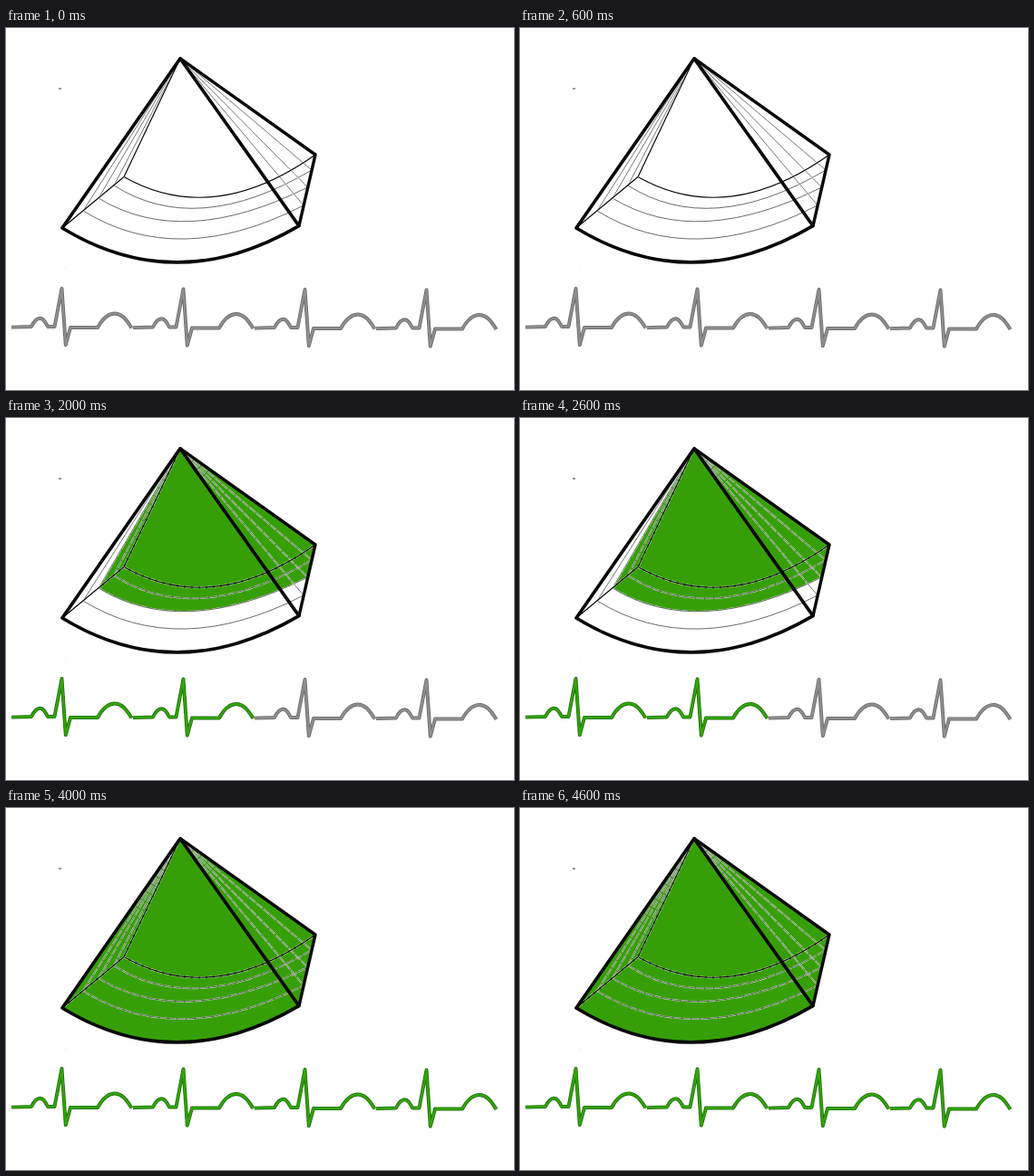
An HTML page for the animation above (5 s loop, 560 by 400 pixels).

```html
<!DOCTYPE html>
<html lang="en">
<head>
<meta charset="utf-8">
<title>Sector volume over four heartbeats</title>
<style>
  html, body { margin: 0; width: 100%; height: 100%; overflow: hidden; background: #fff; }
  svg { display: block; }
  path { fill: none; stroke-linejoin: round; }
</style>
</head>
<body>
<svg id="stage" width="560" height="400" viewBox="0 0 560 400"></svg>
<script>
const stage = document.getElementById('stage');
const APEX = '192 33.7';
const GREEN = '#369f08';

// Depth arcs from back to front: left end, control point, right end
const arcs = [
  ['130 164.5', '228 220', '341 140'],
  ['119 174', '210 232', '337 157'],
  ['102 188', '195 245', '332.5 176'],
  ['85 202', '190 267', '328 196'],
  ['62 221', '188 298', '323 218.7']
];

function path(d, stroke, width, extra = {}) {
  const el = document.createElementNS('http://www.w3.org/2000/svg', 'path');
  const attrs = { d, stroke, 'stroke-width': width, ...extra };
  for (const key in attrs) el.setAttribute(key, attrs[key]);
  stage.append(el);
  return el;
}

const curve = ([left, mid, right]) => `M${left}Q${mid} ${right}`;

// A fine line with a broken pale edge that shows only over the fill
function fine(d, color, width, dash) {
  path(d, '#fff', width + 1, { 'stroke-dasharray': dash, 'stroke-opacity': 0.75 });
  path(d, color, width);
}

const fill = path('', 'none', 0);
fill.style.fill = GREEN;

for (const arc of arcs.slice(1, 4)) {
  fine(curve(arc), '#444', 0.8, '9 1');
  fine(`M${APEX}L${arc[0]}`, '#555', 0.8, '9 1');
  fine(`M${APEX}L${arc[2]}`, '#555', 0.8, '9 1');
}
fine(curve(arcs[0]), '#080808', 1.2, '6 2');
fine(`M${APEX}L${arcs[0][0]}L${arcs[4][0]}`, '#080808', 1.2, '6 2');

path(`M${APEX}L341 140L${arcs[4][2]}`, '#080808', 3.4);
path(`M${APEX}L62 221Q188 298 ${arcs[4][2]}Z`, '#080808', 3.7);
path('M58 67h3', '#333', 1);
path('M65 266h1', '#ddd', 1);

const BEAT = 'M6 330.6L28 330C31 324 34 320.8 37.5 320.8S43 324 46 330H53.5' +
  'L61.5 288L65.8 350.3L71 331H101C107 320 113 315.5 120 315.5S132 321 138.5 331.5';
const beats = [0, 1, 2, 3].map(i => {
  const transform = `translate(${i * 134} ${i * 0.5})`;
  return [path(BEAT, '', 3.9, { transform }), path(BEAT, '', 2.3, { transform })];
});

const GREY = ['#686868', '#8e8e8e'];
const DARK = ['#0b560b', '#117811'];
const BRIGHT = ['#1d6a08', '#32a50a'];

let shown = -1;
function draw() {
  const step = Math.floor(performance.now() % 5000 / 1000);
  if (step !== shown) {
    shown = step;
    const [left, mid, right] = arcs[step];
    fill.setAttribute('d', step ? `M${APEX}L${left}Q${mid} ${right}L341 140Z` : '');
    beats.forEach((layers, i) => {
      const colors = i >= step ? GREY : step === 1 ? DARK : BRIGHT;
      layers.forEach((layer, k) => layer.setAttribute('stroke', colors[k]));
    });
  }
  requestAnimationFrame(draw);
}
draw();
</script>
</body>
</html>
```
